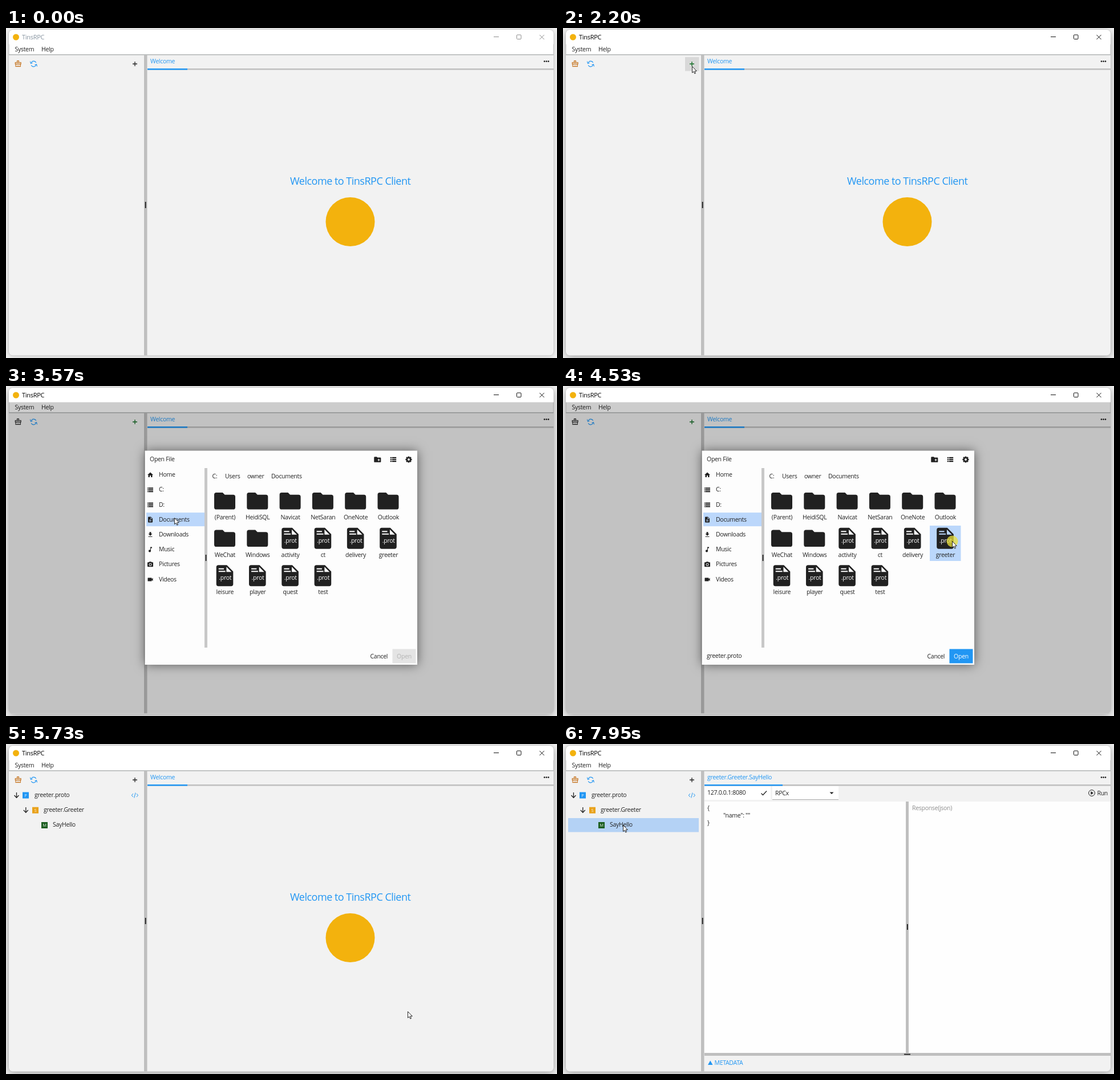
These frames come from a looping animation (966 by 579 pixels, 8000 ms). An HTML page with a canvas:

```html
<!DOCTYPE html>
<html lang="en">
<head>
<meta charset="utf-8">
<title>TinsRPC</title>
<style>
html, body { margin: 0; width: 100%; height: 100%; overflow: hidden; background: #f1f1f1; }
canvas { display: block; width: 966px; height: 579px; }
</style>
</head>
<body>
<canvas id="stage" width="966" height="579"></canvas>
<script>
const ctx = document.getElementById('stage').getContext('2d');
const LOOP = 8000;
const BLUE = '#2196f3', INK = '#212121', PANEL = '#f2f2f2', BAR = '#bfbfbf', SELECTED = '#bbd7fb';
const HOVER = 'rgba(0,0,0,.06)';

// Icons on a 24 unit grid
const sheet = 'M14 2H6Q4 2 4 4V20Q4 22 6 22H18Q20 22 20 20V8z';
const shapes = {
  home: 'M10 20v-6h4v6h5v-8h3L12 3 2 12h3v8z',
  drive: 'M2 4h20v4H2zM4 5h2v2H4zM2 10h20v4H2zM4 11h2v2H4zM2 16h20v4H2zM4 17h2v2H4z',
  doc: sheet + 'M8 12h8v2H8zM8 16h8v2H8zM13 9V3.5L18.5 9z',
  down: 'M19 9h-4V3H9v6H5l7 7 7-7zM5 18v2h14v-2H5z',
  music: 'M12 3v10.5A4 4 0 1 0 14 17V7h4V3z',
  camera: 'M9 2L7.2 4H4Q2 4 2 6V18Q2 20 4 20H20Q22 20 22 18V6Q22 4 20 4H16.8L15 2zM7 12a5 5 0 1 0 10 0 5 5 0 1 0-10 0M8.8 12a3.2 3.2 0 1 0 6.4 0 3.2 3.2 0 1 0-6.4 0',
  video: 'M17 10.5V7Q17 6 16 6H4Q3 6 3 7V17Q3 18 4 18H16Q17 18 17 17V13.5l4 4v-11z',
  folder: 'M10 4H4Q2 4 2 6V18Q2 20 4 20H20Q22 20 22 18V8Q22 6 20 6H12z',
  file: sheet + 'M6.2 5h5v1h-5zM6.2 7.4h6.4v1H6.2zM13.6 3.6V8.4H18.4z',
  list: 'M2 4h4v4H2zM7.5 4H22v4H7.5zM2 10h4v4H2zM7.5 10H22v4H7.5zM2 16h4v4H2zM7.5 16H22v4H7.5z'
};
const icons = {};
for (const name in shapes) icons[name] = new Path2D(shapes[name]);

const places = [
  ['home', 'Home'], ['drive', 'C:'], ['drive', 'D:'], ['doc', 'Documents'],
  ['down', 'Downloads'], ['music', 'Music'], ['camera', 'Pictures'], ['video', 'Videos']
];
const docFolders = ['(Parent)', 'HeidiSQL', 'Navicat', 'NetSaran', 'OneNote', 'Outlook', 'WeChat', 'Windows'];
const docFiles = ['activity', 'ct', 'delivery', 'greeter', 'leisure', 'player', 'quest', 'test'];
const GREETER = 11;

// Pointer: start, end, steps, x, y
const origin = [916, 538];
const moves = [
  [720, 1480, 12, 227, 68], [1590, 1590, 1, 226, 67], [2850, 3310, 8, 295, 231],
  [3660, 4120, 8, 696, 271], [4320, 4390, 2, 682, 272], [4860, 5460, 10, 704, 469],
  [6210, 6890, 11, 106, 142], [7230, 7230, 1, 105, 142]
];
const clicks = [[1870, 2070], [3310, 3510], [4530, 4660], [5610, 5730], [7620, 7750]];

function pointerAt(t) {
  let [x, y] = origin;
  for (const [start, end, steps, toX, toY] of moves) {
    if (t < start) break;
    const step = end > start ? Math.floor((t - start) / (end - start) * (steps - 1) + 1.001) : 1;
    const p = Math.min(1, step / steps), e = p * p * (3 - 2 * p);
    x += (toX - x) * e;
    y += (toY - y) * e;
  }
  return { x, y, shown: t >= 720 };
}

const inside = (p, x, y, w, h) => p.shown && p.x >= x && p.x < x + w && p.y >= y && p.y < y + h;

function rect(x, y, w, h, color) {
  ctx.fillStyle = color;
  ctx.fillRect(x, y, w, h);
}

function disc(x, y, r, color) {
  ctx.fillStyle = color;
  ctx.beginPath();
  ctx.arc(x, y, r, 0, 7);
  ctx.fill();
}

function line(points, color, width = 1) {
  ctx.strokeStyle = color;
  ctx.lineWidth = width;
  ctx.beginPath();
  for (let i = 0; i < points.length; i += 2) ctx.lineTo(points[i], points[i + 1]);
  ctx.stroke();
}

function poly(points, color) {
  ctx.fillStyle = color;
  ctx.beginPath();
  for (let i = 0; i < points.length; i += 2) ctx.lineTo(points[i], points[i + 1]);
  ctx.closePath();
  ctx.fill();
}

function text(str, x, y, color = INK, size = 10.5, align = 'left') {
  ctx.font = `${size}px "Open Sans", "Noto Sans", sans-serif`;
  ctx.letterSpacing = `${-0.028 * size}px`;
  ctx.textAlign = align;
  ctx.fillStyle = color;
  ctx.fillText(str, x, y + size * 0.36);
}

function icon(name, cx, cy, size, color = INK) {
  ctx.save();
  ctx.translate(cx - size / 2, cy - size / 2);
  ctx.scale(size / 24, size / 24);
  ctx.fillStyle = color;
  ctx.fill(icons[name], 'evenodd');
  ctx.restore();
}

function drawFrame(active) {
  rect(0, 0, 966, 579, '#f1f1f1');
  ctx.save();
  ctx.shadowColor = `rgba(0,0,0,${active ? 0.34 : 0.2})`;
  ctx.shadowBlur = active ? 14 : 9;
  ctx.shadowOffsetY = active ? 3 : 1;
  ctx.fillStyle = '#fff';
  ctx.beginPath();
  ctx.roundRect(5, 3, 955, 571.5, 7);
  ctx.fill();
  ctx.restore();
  ctx.strokeStyle = '#bdbdbd';
  ctx.lineWidth = 1;
  ctx.stroke();
}

function drawTitle(active) {
  rect(5, 3, 955, 25.5, '#fff');
  disc(17.5, 16, 5.5, '#f3b20d');
  text('TinsRPC', 28, 16, active ? '#000' : '#8794a0', 11);
  const color = active ? '#111' : '#8c8c8c';
  line([855, 15.5, 864, 15.5], color);
  ctx.beginPath();
  ctx.roundRect(895.5, 12, 7.5, 7.5, 1);
  ctx.stroke();
  line([935.5, 12, 943.5, 20], color);
  line([943.5, 12, 935.5, 20], color);
}

function drawToolIcons(modal, plusColor) {
  const broom = modal ? '#333' : '#c77a2a';
  ctx.strokeStyle = broom;
  ctx.lineWidth = 1.2;
  ctx.strokeRect(19.6, 57.5, 2.8, 3);
  ctx.strokeRect(16.3, 60.5, 9.8, 2.8);
  ctx.strokeRect(17, 63.3, 8.4, 4.2);
  line([20, 65.5, 20, 67.5], broom);
  line([22.6, 65.5, 22.6, 67.5], broom);

  for (const turn of [0, Math.PI]) {
    ctx.save();
    ctx.translate(48.5, 63);
    ctx.rotate(turn);
    ctx.strokeStyle = BLUE;
    ctx.lineWidth = 1.2;
    ctx.beginPath();
    ctx.arc(0, 0, 4.8, Math.PI * 1.02, Math.PI * 1.85);
    ctx.stroke();
    line([-6, -4.5, -5.2, -0.8, -1.8, -1.7], BLUE);
    ctx.restore();
  }
  line([222, 63, 230, 63], plusColor, 1.3);
  line([226, 59, 226, 67], plusColor, 1.3);
}

function badge(letter, x, y, color) {
  rect(x, y, 11, 11, color);
  text(letter, x + 5.5, y + 5.7, 'rgba(255,255,255,.85)', 7.5, 'center');
}

function downArrow(x, y) {
  line([x, y - 5, x, y + 4], INK, 1.3);
  line([x - 4, y, x, y + 4.2, x + 4, y], INK, 1.3);
}

function drawTree(t, pointer) {
  if (t >= 7890) rect(9, 130, 229, 24.5, '#b4d2f5');
  else if (inside(pointer, 9, 130, 229, 24.5)) rect(9, 130, 229, 24.5, HOVER);
  downArrow(18.5, 90);
  badge('P', 29, 84.5, BLUE);
  text('greeter.proto', 50, 89);
  line([223, 87, 220.3, 90, 223, 93], BLUE);
  line([227, 85.5, 224.8, 94.5], BLUE);
  line([228.8, 87, 231.5, 90, 228.8, 93], BLUE);
  downArrow(34.8, 116);
  badge('S', 46, 110.7, '#e9a21b');
  text('greeter.Greeter', 66, 115.5);
  badge('M', 62, 137, '#1b5e20');
  text('SayHello', 82, 141.5);
}

function drawTab(title, end) {
  text(title, 253, 58.5, BLUE);
  rect(248, 71, 712, 2.5, BAR);
  rect(248, 71, end - 248, 2.5, BLUE);
}

function drawWelcome() {
  drawTab('Welcome', 318);
  text('Welcome to TinsRPC Client', 603.7, 269, BLUE, 18, 'center');
  disc(603.5, 340, 43, '#f3b20d');
}

function drawRequest() {
  drawTab('greeter.Greeter.SayHello', 385);
  rect(248, 74, 116, 24, '#fff');
  text('127.0.0.1:8080', 253, 85.5);
  line([347.5, 86.5, 350.5, 89.5, 357, 82.5], INK, 1.3);
  rect(367, 74, 116, 23, '#fff');
  rect(367, 97, 116, 1, '#aaa');
  text('RPCx', 372, 86);
  poly([467.5, 84.5, 474.5, 84.5, 471, 88], INK);
  ctx.strokeStyle = INK;
  ctx.lineWidth = 1;
  ctx.beginPath();
  ctx.arc(927, 86, 5.4, 0, 7);
  ctx.stroke();
  poly([925.3, 83, 930, 86, 925.3, 89], INK);
  text('Run', 936.5, 86);

  rect(248, 101, 712, 441, '#fefefe');
  text('{', 253, 112.5);
  text('"name": ""', 281, 125.5);
  text('}', 253, 138);
  text('Response(json)', 612, 112.5, '#8d8d8d');
  rect(601, 101, 5, 441, BAR);
  rect(603, 316, 1.7, 10, '#111');
  rect(248, 542, 712, 5, BAR);
  rect(598, 543.7, 11, 1.6, '#111');
  poly([254, 563, 262.5, 563, 258.2, 555.5], BLUE);
  text('METADATA', 265.5, 559, BLUE);
}

function drawMain(t, pointer, modal) {
  text('System', 15.5, 37.5);
  text('Help', 62, 37.5);
  rect(5, 46, 955, 529, PANEL);
  rect(5, 46, 955, 1.7, '#b9bdbd');
  rect(242, 47, 5.5, 528, BAR);
  rect(243.8, 305, 1.7, 11, '#111');
  if (inside(pointer, 214, 51, 24.5, 24.5)) rect(214, 51, 24.5, 24.5, 'rgba(0,0,0,.1)');
  const green = (t >= 1870 && t < 2590) || (t >= 2850 && t < 5730);
  drawToolIcons(modal, green ? '#0d6b20' : INK);
  for (const x of [944, 947.5, 951]) disc(x, 58.5, 1.3, '#111');
  if (t >= 5730) drawTree(t, pointer);
  if (t >= 7890) drawRequest();
  else drawWelcome();
}

function drawCell(index, kind, label, ext, pointer, selected) {
  const cx = 383.5 + 57.3 * (index % 6), top = 179.5 + 65.5 * Math.floor(index / 6);
  if (selected) rect(cx - 27, top, 54.5, 62, SELECTED);
  else if (inside(pointer, cx - 27, top, 54.5, 62)) rect(cx - 27, top, 54.5, 62, HOVER);
  icon(kind, cx, top + 22.3, 44.4);
  if (ext) text(ext, cx + 0.7, top + (kind === 'file' ? 26 : 25), '#fff', 10.5, 'center');
  text(label, cx + 0.4, top + 51, INK, 10.5, 'center');
}

function drawFiles(t, pointer) {
  ctx.save();
  ctx.beginPath();
  ctx.rect(353, 172, 366, 287);
  ctx.clip();
  if (t < 3510) {
    for (let i = 0; i < 30; i++) {
      const label = i < 1 ? '(Parent)' : i < 10 ? '.AppCod' : i < 19 ? '.CLion20' : '.DataGrip';
      drawCell(i, 'folder', label, i ? '.' + ((i - 1) % 3 + 1) : '', pointer);
    }
    rect(716, 177, 2.5, 52.5, '#555');
    const shade = ctx.createLinearGradient(0, 455, 0, 459);
    shade.addColorStop(0, 'rgba(0,0,0,0)');
    shade.addColorStop(1, 'rgba(0,0,0,.2)');
    rect(353, 455, 366, 4, shade);
  } else {
    docFolders.forEach((name, i) => drawCell(i, 'folder', name, '', pointer));
    docFiles.forEach((name, i) => {
      const index = i + docFolders.length;
      drawCell(index, 'file', name, '.prot', pointer, index === GREETER && t >= 4530);
    });
  }
  ctx.restore();
}

function drawGear(x, y) {
  for (let i = 0; i < 4; i++) {
    const a = i * Math.PI / 4, dx = Math.cos(a) * 5.6, dy = Math.sin(a) * 5.6;
    line([x - dx, y - dy, x + dx, y + dy], INK, 2.6);
  }
  disc(x, y, 4.3, INK);
  disc(x, y, 1.9, '#fdfdfd');
}

function drawDialog(t, pointer) {
  rect(5, 28.5, 955, 546, 'rgba(0,0,0,.2)');
  ctx.save();
  ctx.shadowColor = 'rgba(0,0,0,.55)';
  ctx.shadowBlur = 18;
  rect(243.5, 113.5, 477.5, 375.5, '#fdfdfd');
  ctx.restore();

  text('Open File', 252, 128);
  icon('folder', 651.3, 129, 14.5);
  line([651.5, 129.8, 655.5, 129.8], '#fff', 1.1);
  line([653.5, 127.8, 653.5, 131.8], '#fff', 1.1);
  icon('list', 679, 129, 12.5);
  drawGear(706, 129);

  const current = t < 3510 ? 0 : 3;
  places.forEach(([shape, label], i) => {
    const y = 155.5 + 26.2 * i;
    if (i === current) rect(246, y - 12, 102, 24, SELECTED);
    else if (inside(pointer, 246, y - 12, 102, 24)) rect(246, y - 12, 102, 24, HOVER);
    icon(shape, 253, y + 0.5, 12);
    text(label, 268, y);
  });
  rect(348, 144, 5, 315, '#c8c8c8');
  rect(349.7, 296, 1.7, 11, '#111');

  text('C:', 361.5, 158.5);
  text('Users', 384, 158.5);
  text('owner', 423, 158.5);
  if (current) text('Documents', 465, 158.5);
  drawFiles(t, pointer);

  const enabled = t >= 4530;
  const over = inside(pointer, 677.5, 461.5, 41, 25);
  if (enabled) text('greeter.proto', 252, 473.5);
  text('Cancel', 638.5, 474);
  rect(677.5, 461.5, 41, 25, enabled ? (over ? '#1f88de' : BLUE) : '#e4e4e4');
  text('Open', 698, 474, enabled ? '#fff' : '#b3b3b3', 10.5, 'center');
}

function drawPointer(t, { x, y, shown }) {
  if (!shown) return;
  if (clicks.some(([from, to]) => t >= from && t < to)) disc(x + 0.5, y + 0.5, 10, 'rgba(235,225,60,.75)');
  ctx.save();
  ctx.translate(x + 0.5, y + 0.5);
  const arrow = [0, 0, 0, 11, 2.6, 8.8, 4.3, 12.6, 6, 11.8, 4.4, 8.2, 7.8, 8, 0, 0];
  poly(arrow, '#fff');
  line(arrow, '#111', 0.9);
  ctx.restore();
}

function draw(t) {
  const pointer = pointerAt(t), active = t >= 1870, modal = t >= 2590 && t < 5730;
  drawFrame(active);
  ctx.save();
  ctx.beginPath();
  ctx.roundRect(5, 3, 955, 571.5, 7);
  ctx.clip();
  drawTitle(active);
  drawMain(t, pointer, modal);
  if (modal) drawDialog(t, pointer);
  ctx.restore();
  drawPointer(t, pointer);
}

function tick() {
  draw(performance.now() % LOOP);
  requestAnimationFrame(tick);
}
tick();
</script>
</body>
</html>
```
